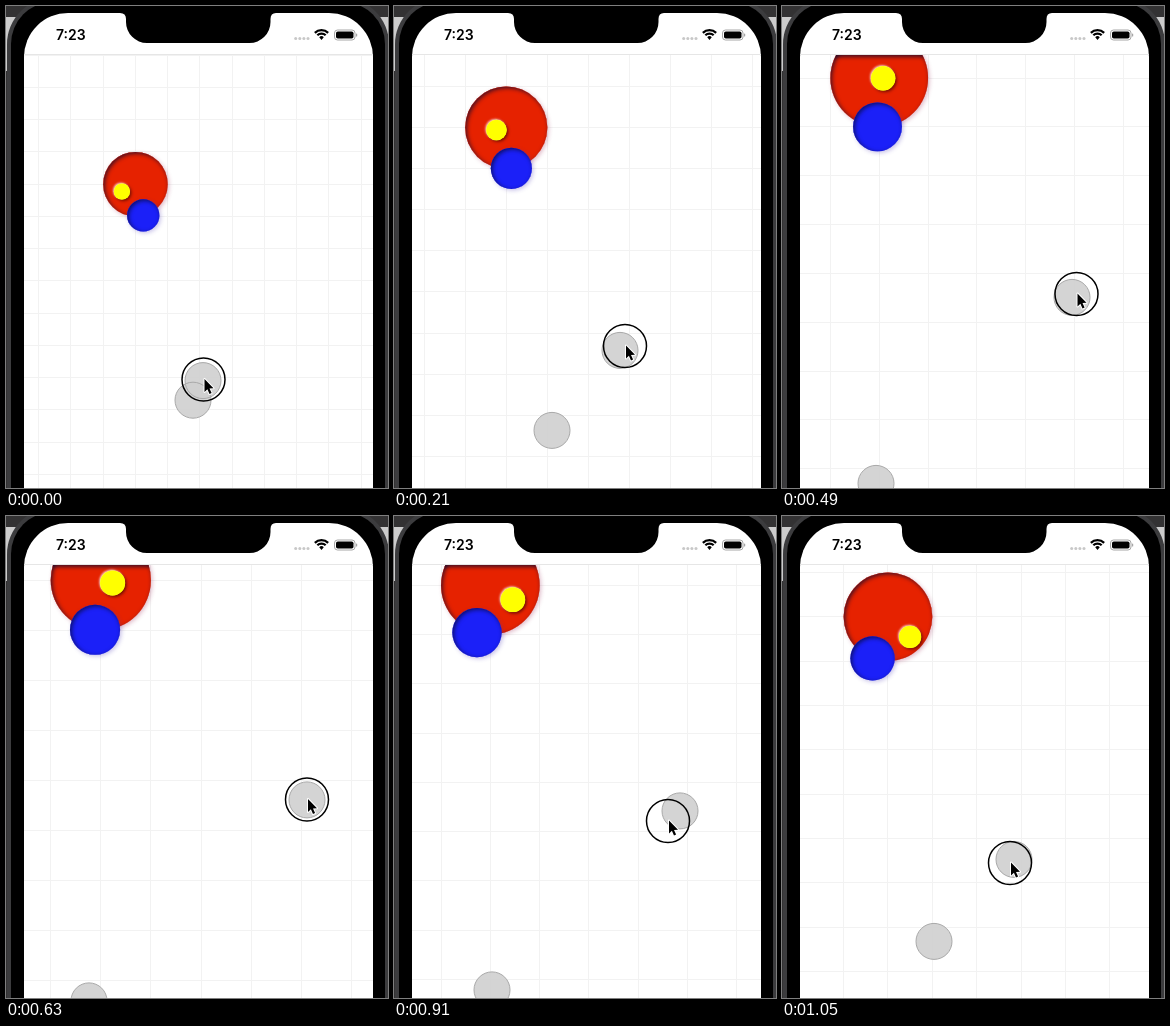
Animation of 382x482 px, one loop 1.12 s. Source, as an HTML page with a canvas:

```html
<!DOCTYPE html>
<html lang="en">
<head>
<meta charset="utf-8">
<title>Pinch zoom</title>
<style>
  html, body { margin: 0; width: 100%; height: 100%; overflow: hidden; background: #ccc; }
  canvas { display: block; }
</style>
</head>
<body>
<canvas id="stage" width="382" height="482"></canvas>
<script>
const ctx = document.getElementById('stage').getContext('2d');
const LOOP = 1120, STEP = 70;
const TAU = Math.PI * 2, RAD = Math.PI / 180;
const CENTER = { x: 192, y: 384.4 };  // fixed point of the zoom
const VIEW = { x: 18, y: 49, w: 349, h: 433 };

// time, grid spacing, pointer x, pointer y, finger offset x, finger offset y
const KEYS = [
  [0, 32.25, 197.5, 373.5, 5, -9.8],
  [210, 41.1, 231, 340, 34, -40],
  [350, 45, 261.5, 313.5, 61, -63],
  [490, 48.85, 294.5, 288, 98, -93],
  [610, 50.1, 301, 283.5, 109, -100.5],
  [770, 50.05, 300.5, 284, 109, -100.5],
  [910, 49.3, 274, 305, 94, -89.5],
  [1050, 44.35, 228, 347, 40, -41]
];

const secant = (i, c) => (KEYS[i + 1][c] - KEYS[i][c]) / (KEYS[i + 1][0] - KEYS[i][0]);

// Slope that never overshoots the neighbouring keys
function slope(i, c) {
  if (i === 0) return secant(0, c);
  if (i === KEYS.length - 1) return secant(i - 1, c);
  const a = secant(i - 1, c), b = secant(i, c);
  return a * b > 0 ? 2 * a * b / (a + b) : 0;
}

function sample(t, c) {
  let i = 0;
  while (i < KEYS.length - 2 && t > KEYS[i + 1][0]) i++;
  const p = KEYS[i], q = KEYS[i + 1], span = q[0] - p[0];
  const u = (t - p[0]) / span, v = 1 - u;
  return p[c] * (1 + 2 * u) * v * v + q[c] * (3 - 2 * u) * u * u
    + span * (slope(i, c) * u * v * v - slope(i + 1, c) * u * u * v);
}

function disc(x, y, r, fill, stroke, width = 1) {
  ctx.beginPath();
  ctx.arc(x, y, r, 0, TAU);
  if (fill) { ctx.fillStyle = fill; ctx.fill(); }
  if (stroke) { ctx.strokeStyle = stroke; ctx.lineWidth = width; ctx.stroke(); }
}

function box(x, y, w, h, r, fill) {
  ctx.beginPath();
  ctx.roundRect(x, y, w, h, r);
  ctx.fillStyle = fill;
  ctx.fill();
}

function shadow(color, blur, offset) {
  ctx.shadowColor = color;
  ctx.shadowBlur = blur;
  ctx.shadowOffsetX = ctx.shadowOffsetY = offset;
}

// Disc with a soft drop shadow and an inner shadow, cast by its rim and the header
function ball(x, y, r, color, glow) {
  ctx.save();
  shadow(glow, 4, 1.5);
  disc(x, y, r, color);
  ctx.clip();
  shadow('rgba(10,10,50,.75)', 4, 1.5);
  ctx.fillStyle = color;
  ctx.beginPath();
  ctx.rect(x - r - 20, y - r - 20, 2 * r + 40, 2 * r + 40);
  ctx.arc(x, y, r, 0, TAU);
  ctx.fill('evenodd');
  ctx.fillRect(VIEW.x, 0, VIEW.w, VIEW.y);
  ctx.restore();
}

function grid(ox, oy, s) {
  const snap = v => Math.floor(v) + .5;
  ctx.beginPath();
  for (let x = ox % s; x < 382; x += s) {
    ctx.moveTo(snap(x), VIEW.y);
    ctx.lineTo(snap(x), 482);
  }
  for (let y = oy % s; y < 482; y += s) {
    ctx.moveTo(VIEW.x, snap(y));
    ctx.lineTo(VIEW.x + VIEW.w, snap(y));
  }
  ctx.strokeStyle = '#f2f2f2';
  ctx.lineWidth = 1;
  ctx.stroke();
}

function scene(t, s) {
  const ox = CENTER.x - 1.94 * s, oy = CENTER.y - 6.395 * s;
  const swing = (14 - .0327 * t) * RAD;
  const orbit = (-57 + .135 * t) * RAD;
  ctx.save();
  ctx.beginPath();
  ctx.rect(VIEW.x, VIEW.y, VIEW.w, VIEW.h);
  ctx.clip();
  grid(ox, oy, s);
  ball(ox, oy, s, '#e62200', 'rgba(150,30,80,.3)');

  const yx = ox + .5 * s * Math.sin(orbit);
  const yy = oy + .5 * s * (1 - Math.cos(orbit));
  ctx.save();
  shadow('rgba(40,0,0,.6)', 3, 1.5);
  disc(yx, yy, s / 4, '#ff0');
  shadow('rgba(255,255,255,.7)', 2, -1);
  disc(yx, yy, s / 4, '#ff0');
  ctx.restore();

  ball(ox + s * Math.sin(swing), oy + s * Math.cos(swing), s / 2,
    '#1b20f8', 'rgba(70,50,180,.3)');
  ctx.restore();
}

function phone() {
  ctx.fillStyle = '#333233';
  ctx.fillRect(0, 0, 382, 482);
  ctx.fillStyle = '#ccc';
  ctx.fillRect(0, 11, 382, 54);
  box(1, -8, 382, 600, 46, '#3c3c3e');
  box(5, -4, 374, 600, 42, '#000');
  box(VIEW.x, 7, VIEW.w, 600, 44, '#fff');
  ctx.fillStyle = '#e6e6e6';
  ctx.fillRect(VIEW.x, 48, VIEW.w, 1);
}

function notch() {
  ctx.fillStyle = '#000';
  ctx.beginPath();
  ctx.moveTo(114, 7);
  ctx.quadraticCurveTo(120, 7, 120, 13);
  ctx.arcTo(120, 37, 144, 37, 21);
  ctx.arcTo(264.5, 37, 264.5, 13, 21);
  ctx.lineTo(264.5, 13);
  ctx.quadraticCurveTo(264.5, 7, 270, 7);
  ctx.fill();
}

function statusBar() {
  ctx.fillStyle = '#000';
  ctx.font = '600 14px Inter, "Liberation Sans", sans-serif';
  ctx.fillText('7:23', 50, 34);
  for (let i = 0; i < 4; i++) disc(289.7 + i * 4.1, 32.6, 1.5, '#c8c8c8');

  ctx.strokeStyle = '#000';
  ctx.lineWidth = 2.2;
  for (const r of [9.4, 5.9]) {
    ctx.beginPath();
    ctx.arc(315.5, 33.5, r, -Math.PI * .75, -Math.PI * .25);
    ctx.stroke();
  }
  ctx.beginPath();
  ctx.moveTo(315.5, 34);
  ctx.arc(315.5, 33.5, 3.2, -Math.PI * .75, -Math.PI * .25);
  ctx.fillStyle = '#000';
  ctx.fill();

  ctx.beginPath();
  ctx.roundRect(328.5, 24, 20.5, 10, 3);
  ctx.strokeStyle = '#a6a6a6';
  ctx.lineWidth = 1;
  ctx.stroke();
  box(330, 25.5, 17.5, 7, 1.8, '#000');
  box(350, 27.5, 1.2, 3, 1, '#a6a6a6');
}

function cursor(x, y) {
  const points = [[0, 0], [0, 13], [2.9, 10.3], [5, 15], [7.1, 14.1], [5, 9.5], [9, 9.3]];
  ctx.beginPath();
  points.forEach(([dx, dy]) => ctx.lineTo(x + dx, y + dy));
  ctx.closePath();
  ctx.lineJoin = 'round';
  ctx.strokeStyle = '#fff';
  ctx.lineWidth = 2;
  ctx.stroke();
  ctx.fillStyle = '#000';
  ctx.fill();
}

function draw(t) {
  const [s, px, py, dx, dy] = [1, 2, 3, 4, 5].map(c => sample(t, c));
  phone();
  scene(t, s);
  notch();
  statusBar();

  const fingers = [1, -1].map(k => [CENTER.x + k * dx, CENTER.y + k * dy]);
  for (const [x, y] of fingers) disc(x, y, 18, 'rgba(208,208,208,.9)');
  for (const [x, y] of fingers) disc(x, y, 18, null, '#a9a9a9');
  disc(px, py, 21.5, null, '#000', 1.5);
  cursor(px + 1, py - .5);
}

const start = performance.now();
function tick() {
  const t = (performance.now() - start) % LOOP;
  draw(Math.floor(t / STEP) * STEP);
  requestAnimationFrame(tick);
}
tick();
</script>
</body>
</html>
```
